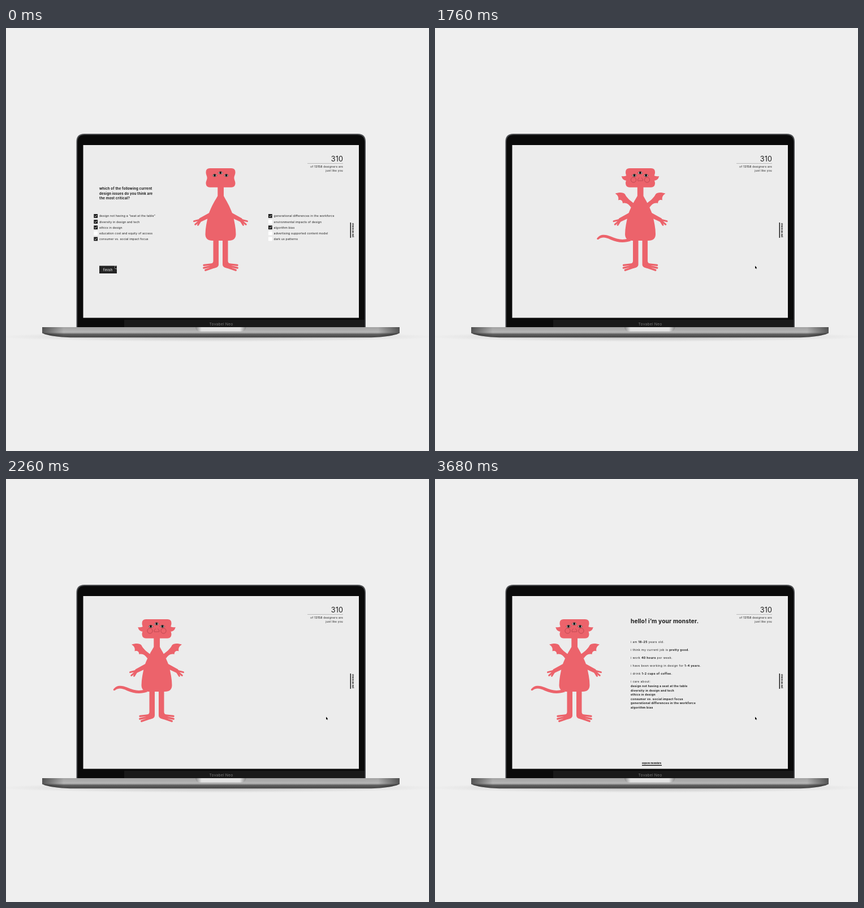
These frames come from a looping animation (748x748 px, 4740 ms). An HTML page:

```html
<!DOCTYPE html>
<html lang="en">
<head>
<meta charset="utf-8">
<title>Monster survey</title>
<style>
html, body { margin: 0; height: 100%; overflow: hidden; background: #efefef; }
svg { display: block; width: 100vw; height: 100vh; }
text { font: 5.2px Inter, sans-serif; letter-spacing: .15px; fill: #1c1c1c; white-space: pre; }
.bold, tspan { font-weight: 700; }
.body { letter-spacing: .37px; }
.care { font-size: 5.1px; letter-spacing: .3px; font-weight: 700; }
.count { font-size: 4.8px; letter-spacing: .3px; text-anchor: end; }
.link { font-size: 4px; letter-spacing: 0; font-weight: 700; fill: #000; }
.skin { fill: #ec636b; }
.limb { fill: none; stroke: #ec636b; stroke-linecap: round; }
.face { fill: none; stroke: #8f2f3a; stroke-width: .5; }
</style>
</head>
<body>
<svg viewBox="0 0 748 748">
  <defs>
    <linearGradient id="metal" x2="0" y2="1">
      <stop stop-color="#a2a2a2"/><stop offset=".5" stop-color="#b6b6b6"/>
      <stop offset=".6" stop-color="#8a8a8a"/><stop offset=".68" stop-color="#606060"/>
      <stop offset="1" stop-color="#454545"/>
    </linearGradient>
    <linearGradient id="edges">
      <stop stop-color="#222" stop-opacity=".65"/><stop offset=".06" stop-color="#222" stop-opacity="0"/>
      <stop offset=".94" stop-color="#222" stop-opacity="0"/><stop offset="1" stop-color="#222" stop-opacity=".65"/>
    </linearGradient>
    <linearGradient id="notch">
      <stop stop-color="#8a8a8a"/><stop offset=".12" stop-color="#e2e2e2"/>
      <stop offset=".88" stop-color="#e2e2e2"/><stop offset="1" stop-color="#8a8a8a"/>
    </linearGradient>
    <radialGradient id="shadow">
      <stop stop-color="#555" stop-opacity=".35"/><stop offset=".7" stop-color="#888" stop-opacity=".14"/>
      <stop offset="1" stop-color="#999" stop-opacity="0"/>
    </radialGradient>
    <path id="deck" d="M64 529H696V539.5C686 544 668 547.3 634 547.3H126C92 547.3 74 544 64 539.5Z"/>
    <g id="eye">
      <path d="M-4 .4Q-2.4-2.3 0-2.3T4 .4Q2.2 2.3 0 2.3T-4 .4Z" fill="#fff" stroke="#111" stroke-width=".6"/>
      <circle r="2.1" fill="#111"/>
    </g>
    <g id="limbs">
      <path class="skin" d="M361 326L342 336.5Q339 340 344 343L357 337ZM366.5 374V412Q366.5 416 362 417L363 425Q376 425 376 418V374Z"/>
      <path class="limb" stroke-width="3" d="M343.5 339L332.5 341.6M343.5 340L334.7 347.4M344 341L339.5 348.2"/>
      <path class="limb" stroke-width="3.4" d="M366 417.6L350 419.4M367 420.5L349.8 424.2M368 423L352.8 428.2"/>
    </g>
    <path id="side" class="skin" d="M335 292.7C342 290.5 349 290 352.5 294C355.5 300 360 304 368 310L363 317.5C359 311.5 355 308.5 348.5 310C348 305.5 346 303 340.5 304.5C341.5 300 340.5 296 335 292.7ZM346.2 262Q351 262.8 355 261L359 265L358 270Q348.5 271 346.2 262Z"/>
  </defs>

  <ellipse cx="374" cy="546" rx="390" ry="9" fill="url(#shadow)"/>
  <path d="M124.5 529V201Q124.5 187 138.5 187H622Q636 187 636 201V529Z" fill="#4b4d50"/>
  <path d="M126.3 529V202Q126.3 189 139.3 189H621Q634.2 189 634.2 202V529Z" fill="#0a0a0a"/>
  <path d="M209 516H634V529H209Z" fill="#191919"/>
  <rect x="136.5" y="207" width="487.5" height="305.5" fill="#ececec"/>
  <text x="380.5" y="526" text-anchor="middle" style="font-size:6.8px;fill:#777">Tovabel Neo</text>
  <use href="#deck" fill="url(#metal)"/>
  <use href="#deck" fill="url(#edges)"/>
  <path d="M335 529H424.5Q424 536.5 415 536.5H344Q335.5 536.5 335 529Z" fill="url(#notch)"/>

  <text x="596" y="235.6" text-anchor="end" style="font-size:12.6px">310</text>
  <path d="M533 239.5H596" stroke="#999" stroke-width=".6"/>
  <text class="count" x="596" y="247.3">of <tspan style="font-weight:500">13158</tspan> designers are</text>
  <text class="count" x="596" y="254.1">just like you</text>
  <path d="M609.3 344V371" stroke="#000" stroke-width="1.3"/>
  <text class="link" transform="translate(611.5 345)rotate(90)">check us out</text>

  <g id="survey"></g>
  <g id="button">
    <rect id="plate" x="165" y="420.5" width="31" height="13.5"/>
    <text x="171.7" y="429.6" style="font-size:6.2px;fill:#fff">finish</text>
  </g>

  <g id="monster">
    <g class="extra">
      <use href="#side"/><use href="#side" transform="matrix(-1 0 0 1 759 0)"/>
      <path class="skin" d="M302.6 372.4C308 363.8 318 364.5 327 368.6C339 374 348 375.4 358 372.5L363 376.5C351 380.5 339 379.6 327 374.2C318 370 312 369 306 373.4Q303 375 302.6 372.4Z"/>
    </g>
    <use href="#limbs"/><use href="#limbs" transform="matrix(-1 0 0 1 759 0)"/>
    <path class="skin" d="M360.5 248H398.5Q405.5 248 405.5 255C405.5 260 403.4 261 403.4 265S405.5 270 405.5 275Q405 281.7 398.5 281.7H385V297C388 303 395.5 314 401 330C404 342 406.5 354 406.5 365Q406 376 394 376H365Q353 376 352.5 365C352.5 354 355 342 358 330C363.5 314 371 303 374.3 297V281.7H360.5Q354 281.7 353.5 275C353.5 270 355.6 269 355.6 265S353.5 260 353.5 255Q353.5 248 360.5 248Z"/>
    <use href="#eye" x="369" y="260.6"/><use href="#eye" x="379.3" y="256"/><use href="#eye" x="389.6" y="260.6"/>
    <g class="extra face">
      <circle cx="367.5" cy="268.5" r="4.6"/><circle cx="391.5" cy="268.5" r="4.6"/>
      <path d="M377.5 264.5C377 266 375 267 375 269S377 270.5 378 269.8Q379.5 271 381 269.8C382 270.5 384 270.6 384 269S382 266 381.5 264.5"/>
    </g>
  </g>

  <g id="profile">
    <text class="bold" x="346" y="254.8" style="font-size:10.2px">hello! i’m your monster.</text>
    <text class="link" x="366" y="503.8">explore monsters</text>
    <path d="M366 506.4H401" stroke="#000" stroke-width="1.2"/>
  </g>
  <path id="cursor" d="M0 0V5L1.2 4L2 5.7L2.8 5.3L2.1 3.7H3.5Z" fill="#000" stroke="#fff" stroke-width=".8" paint-order="stroke"/>
</svg>
<script>
const LOOP = 4740;
const get = id => document.getElementById(id);
const add = (id, markup) => get(id).insertAdjacentHTML("beforeend", markup);
const label = (x, y, content, style = "") => `<text class="${style}" x="${x}" y="${y}">${content}</text>`;

["which of the following current", "design issues do you think are", "the most critical?"].forEach((line, i) =>
  add("survey", `<text class="bold" x="165" y="${286.4 + i * 8.5}" style="font-size:6.1px">${line}</text>`));

// A leading * marks a ticked answer.
function checklist(x, items) {
  items.forEach((item, i) => {
    const y = 332.4 + i * 10.15, ticked = item[0] === "*";
    add("survey", `<rect x="${x}" y="${y - 3.4}" width="6.8" height="6.8" fill="${ticked ? "#1c1c1c" : "#fff"}"/>`
      + (ticked ? `<path d="M${x + 1.5} ${y}l1.4 1.4l2.5-2.8" fill="none" stroke="#fff" stroke-width=".9"/>` : "")
      + label(x + 9.7, y + 2, item.replace("*", "")));
  });
}
checklist(155.3, ["*design not having a “seat at the table”", "*diversity in design and tech", "*ethics in design",
  "education cost and equity of access", "*consumer vs. social impact focus"]);
checklist(463.9, ["*generational differences in the workforce", "environmental impacts of design", "*algorithm bias",
  "advertising supported content model", "dark ux patterns"]);

["i am <tspan>18-25</tspan> years old.", "i think my current job is <tspan>pretty good.</tspan>",
  "i work <tspan>40 hours</tspan> per week.", "i have been working in design for <tspan>1-4 years.</tspan>",
  "i drink <tspan>1-2 cups of coffee.</tspan>", "i care about:"
].forEach((line, i) => add("profile", label(346, 289.6 + i * 14.15, line, "body")));
["design not having a seat at the table", "diversity in design and tech", "ethics in design",
  "consumer vs. social impact focus", "generational differences in the workforce", "algorithm bias"
].forEach((line, i) => add("profile", label(346, 368 + i * 7.6, line, "care")));

// Sine ease in and out between two times.
const ease = (t, from, to) => (1 - Math.cos(Math.PI * Math.min(1, Math.max(0, (t - from) / (to - from))))) / 2;
const extras = document.querySelectorAll(".extra");

function draw(now) {
  const t = now % LOOP;
  const shade = Math.round(36 - 18 * ease(t, 0, 170));
  get("plate").setAttribute("fill", `rgb(${shade},${shade},${shade})`);
  get("survey").setAttribute("opacity", 1 - ease(t, 440, 1000));
  get("button").setAttribute("opacity", 1 - ease(t, 800, 1360));
  extras.forEach(part => part.setAttribute("opacity", ease(t, 1000, 1530)));
  get("monster").setAttribute("transform", `translate(${-133 * ease(t, 1540, 2506)} 0)`);
  get("profile").setAttribute("opacity", ease(t, 2870, 3500));
  const p = ease(t, 800, 1560);
  get("cursor").setAttribute("transform", `translate(${193 + 373 * p} ${420.6 + 6.5 * Math.sin(Math.PI * p)})`);
  requestAnimationFrame(draw);
}
draw(performance.now());
</script>
</body>
</html>
```
